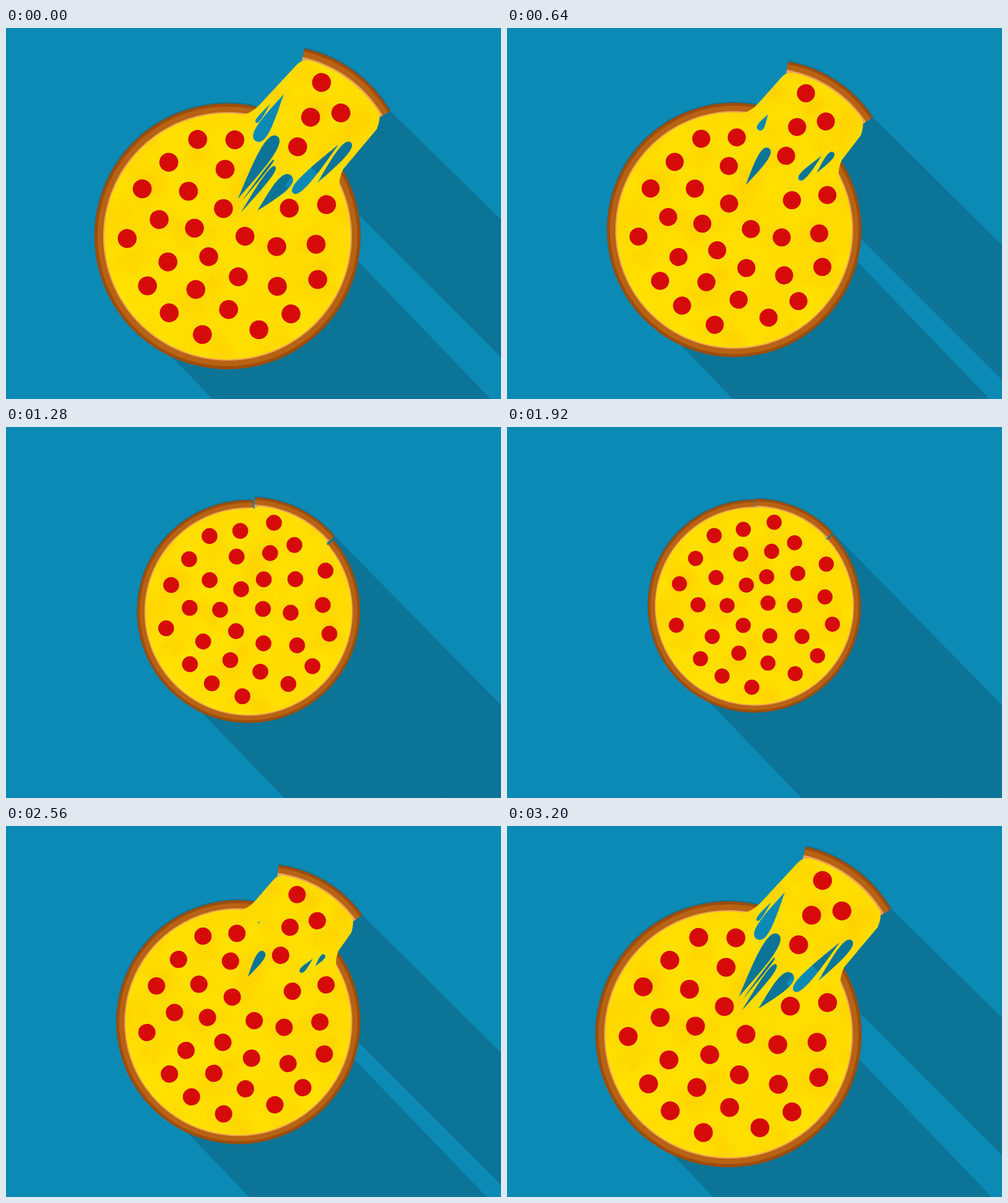
Recreate the animation shown at these times as an HTML page with a canvas. Size 800 by 600 pixels, loop 3240 ms.

```html
<!DOCTYPE html>
<html>
<head>
<meta charset="utf-8">
<title>Pizza</title>
<style>
html, body { margin: 0; width: 100%; height: 100%; overflow: hidden; background: #0c8ab6; }
canvas { display: block; }
</style>
</head>
<body>
<canvas id="stage" width="800" height="600"></canvas>
<script>
const ctx = document.getElementById('stage').getContext('2d');
const SKY = '#0c8ab6', SHADE = '#0c7496', CHEESE = '#ffdc00';
const LOOP = 3240, TURN = 1800, REST = 172, WEDGE = 47;
const rad = deg => deg * Math.PI / 180;

// Pepperoni centres, relative to the pizza centre at its resting size
const pizzaDots = [
  [-65, -114], [-18, -124], [-95, -77], [-22, -84], [-121, -36], [-62, -46], [-13, -34],
  [-91, -2], [-44, -1], [22, -5], [65, -1], [70, -53], [116, -68], [114, -15],
  [-126, 31], [-68, 49], [-18, 31], [25, 48], [77, 49], [126, 29],
  [-87, 85], [-25, 76], [22, 92], [102, 80], [-52, 113], [-4, 131], [66, 109]
];
const sliceDots = [[31, -134], [64, -101], [27, -87], [19, -46]];

// Holes in the stretched cheese: birth point, pointed end, round end, width, pull at birth
const holes = [
  [408, 156, 449, 107, 404, 183, 23, .62],
  [413, 142, 427, 123, 404, 153, 7, .8],
  [402, 222, 375, 276, 438, 175, 24, .39],
  [405, 248, 381, 280, 433, 213, 4, .8],
  [405, 262, 380, 298, 435, 224, 11, .78],
  [432, 268, 407, 295, 461, 239, 23, .76],
  [480, 225, 537, 189, 464, 267, 18, .5],
  [499, 217, 503, 251, 557, 185, 17, .5]
];

const ease = x => .5 - .5 * Math.cos(Math.PI * Math.min(1, Math.max(0, x)));
const swing = (t, inTime, inPow, outTime, outPow) => t < TURN
  ? 1 - ease((t / inTime) ** inPow)
  : ease(1 - (Math.max(0, 3200 - t) / outTime) ** outPow);

// Soft mottling of the cheese
const mottle = document.createElement('canvas');
mottle.width = mottle.height = 480;
{
  const m = mottle.getContext('2d');
  let seed = 11;
  const rnd = () => (seed = seed * 16807 % 2147483647) / 2147483647;
  for (let i = 0; i < 420; i++) {
    const x = rnd() * 480, y = rnd() * 480, r = 10 + rnd() * 22;
    const tint = i % 2 ? '255,198,0' : '255,232,0';
    const g = m.createRadialGradient(x, y, 0, x, y, r);
    g.addColorStop(0, `rgba(${tint},.28)`);
    g.addColorStop(1, `rgba(${tint},0)`);
    m.fillStyle = g;
    m.fillRect(x - r, y - r, 2 * r, 2 * r);
  }
}

function pose(t) {
  const k = swing(t, 1697, 1.2, 1333, 1.1);
  const p = swing(t, 1444, 1.34, 1382, 1.15);
  const cx = 400 - 42 * k, cy = 289.5 + 47.5 * k, R = REST + 43 * k, turn = rad(12.6 * k);
  const c = Math.cos(turn), s = Math.sin(turn);
  const toStage = (x, y) => [cx + R * (x * c - y * s), cy + R * (x * s + y * c)];
  return { k, p, cx, cy, R, turn, toStage, ox: .257 * p, oy: -.505 * p };
}

function poly(points, color) {
  ctx.beginPath();
  points.forEach(q => ctx.lineTo(...q));
  ctx.fillStyle = color;
  ctx.fill();
}

// A long shadow between two rays
function longShadow(a, slopeA, b, slopeB) {
  const far = ([x, y], slope) => [x + 900, y + 900 * slope];
  poly([a, b, far(b, slopeB), far(a, slopeA)], SHADE);
}

function backdrop(o) {
  ctx.fillStyle = SKY;
  ctx.fillRect(0, 0, 800, 600);
  longShadow([o.cx - .67 * o.R, o.cy + .645 * o.R], 1.04, [425 + 15 * o.k, 243], 1.04);
  const lift = Math.min(1, o.p * 1.6);
  const low = o.toStage(o.ox - .058 * lift, o.oy - .329 * lift);
  const corner = o.toStage(o.ox + Math.sin(rad(WEDGE)), o.oy - Math.cos(rad(WEDGE)));
  longShadow(low, 1, corner, 1.02 - .04 * o.p);
  if (o.p > .35)
    poly([[370, 302], [365, 260], [428, 170], [446, 172], [464, 238], [415, 302]], SHADE);
}

function ring(from, to, inner, outer, color) {
  ctx.beginPath();
  ctx.arc(0, 0, (inner + outer) / 2, rad(from - 90), rad(to - 90));
  ctx.lineWidth = outer - inner;
  ctx.strokeStyle = color;
  ctx.stroke();
}

function crust(from, to, paleInner) {
  ctx.save();
  ctx.translate(-.002, -.007);
  ring(from, to, .95, 1.002, SHADE);
  ctx.restore();
  ring(from, to, .97, 1, '#9d4d0b');
  ring(from, to, .93, .977, '#b86214');
  ring(from, to, paleInner, .935, '#eba25c');
}

// Pizza disc, slice and the strands joining their sides
function cheesePath({ p, ox, oy }) {
  const w = Math.min(1, p * 3), r = .922;
  const path = new Path2D();
  path.arc(0, 0, .925, 0, 7);
  path.closePath();
  path.moveTo(-.09, -.915);
  path.quadraticCurveTo(-.02, -.92 - .03 * w, .02 * w, -.92 - .1 * w);
  path.lineTo(ox - .03 * w, oy - .87);
  path.quadraticCurveTo(ox - .003, oy - .915, ox + .05, oy - .92);
  path.arc(ox, oy, r, rad(3.2 - 90), rad(45 - 90));
  path.quadraticCurveTo(ox + .675, oy - .61, ox + .662, oy - .527);
  path.lineTo(.68 + .059 * w, -.62 - .065 * w);
  path.quadraticCurveTo(.69 + .03 * w, -.61, .739, -.557);
  path.lineTo(0, 0);
  path.closePath();
  return path;
}

function dots(list) {
  ctx.fillStyle = '#d70a0a';
  for (const [x, y] of list) {
    ctx.beginPath();
    ctx.arc(x / REST, y / REST, .0712, 0, 7);
    ctx.fill();
  }
}

function holesPath(p) {
  const path = new Path2D();
  for (const [x, y, ax, ay, bx, by, width, birth] of holes) {
    const s = (p - birth) / (1 - birth);
    if (s <= 0) continue;
    const a = [x + (ax - x) * s, y + (ay - y) * s];
    const d = [(bx - ax) * s, (by - ay) * s];
    const len = Math.hypot(...d);
    const w = Math.min(width * s ** .6, len * .6);
    const at = (along, side) => [
      a[0] + d[0] * along - d[1] / len * w * side,
      a[1] + d[1] * along + d[0] / len * w * side
    ];
    path.moveTo(...a);
    path.bezierCurveTo(...at(.4, .3), ...at(1, .9), ...at(1, 0));
    path.bezierCurveTo(...at(1, -.9), ...at(.4, -.3), ...a);
  }
  return path;
}

function draw(t) {
  const o = pose(t);
  backdrop(o);

  ctx.save();
  ctx.translate(o.cx, o.cy);
  ctx.rotate(o.turn);
  ctx.scale(o.R, o.R);

  crust(WEDGE + .5, 360, .92);
  ctx.save();
  ctx.translate(o.ox, o.oy);
  crust(0, WEDGE, .89);
  ctx.restore();

  const cheese = cheesePath(o);
  ctx.fillStyle = CHEESE;
  ctx.fill(cheese);
  ctx.save();
  ctx.clip(cheese);
  ctx.drawImage(mottle, -1.5, -1.5, 3, 3);
  ctx.restore();

  dots(pizzaDots);
  ctx.translate(o.ox, o.oy);
  dots(sliceDots);
  ctx.restore();

  ctx.save();
  ctx.clip(holesPath(o.p));
  backdrop(o);
  ctx.restore();
}

const start = performance.now();
function tick() {
  const t = (performance.now() - start) % LOOP;
  draw(Math.floor(t / 40) * 40);
  requestAnimationFrame(tick);
}
tick();
</script>
</body>
</html>
```
